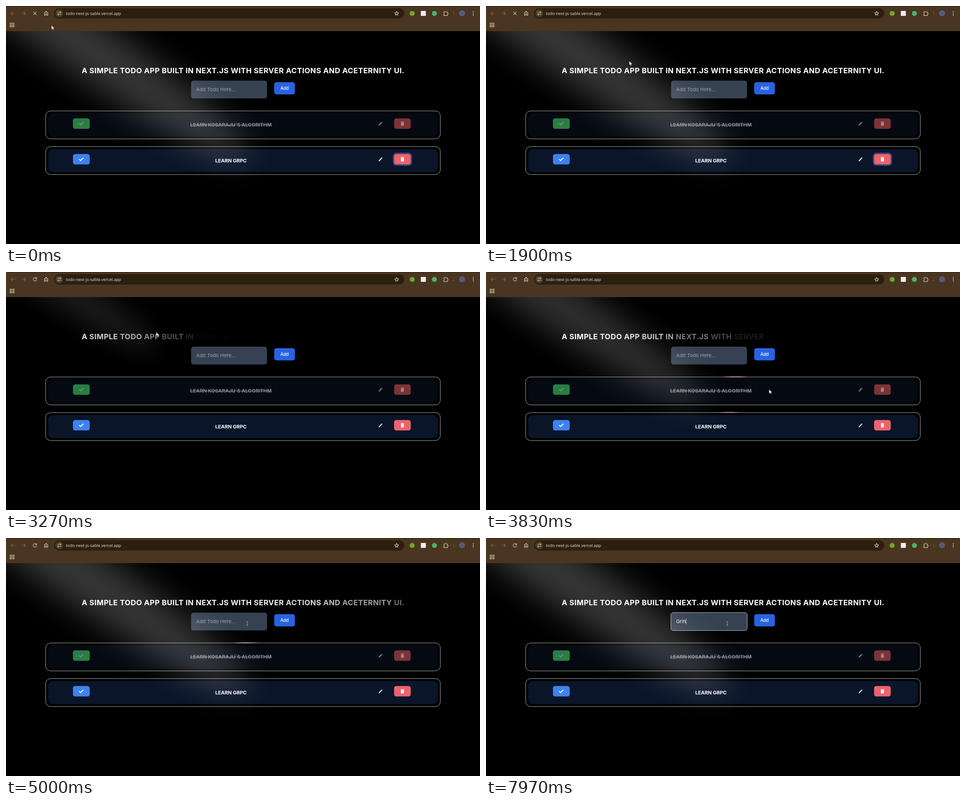
Write an HTML page that moves like this. It is 1055x531 px and loops after 8 s.

```html
<!DOCTYPE html>
<html lang="en">
<head>
<meta charset="utf-8">
<title>Todo app</title>
<style>
  html, body { margin: 0; width: 100%; height: 100%; overflow: hidden; background: #000; }
  svg { display: block; }
  text { font-family: Inter, sans-serif; fill: #fff; }
  .mid { text-anchor: middle; }
  .heading { font-size: 16.56px; font-weight: 700; letter-spacing: .414px; }
  .task { font-size: 11px; font-weight: 700; }
  .field { font-size: 11px; }
  .ui { font-family: "Open Sans", "Noto Sans", sans-serif; fill: #ece5dd; }
  .line { fill: none; stroke: #d9cbbd; stroke-width: 1.1; stroke-linecap: round; stroke-linejoin: round; }
  .dim { stroke: #806c59; }
</style>
</head>
<body>
<svg width="1055" height="531" viewBox="0 0 1055 531">
  <defs>
    <filter id="blur" filterUnits="userSpaceOnUse" x="0" y="0" width="3787" height="2842" color-interpolation-filters="sRGB">
      <feGaussianBlur stdDeviation="151"/>
    </filter>
    <radialGradient id="pink">
      <stop offset=".3" stop-color="#e58abf"/>
      <stop offset="1" stop-color="#e58abf" stop-opacity="0"/>
    </radialGradient>
    <path id="pencil" d="M3 17.25V21h3.75L17.81 9.94l-3.75-3.75zM20.71 7.04a1 1 0 0 0 0-1.41l-2.34-2.34a1 1 0 0 0-1.41 0l-1.83 1.83 3.75 3.75z"/>
    <path id="trash" d="M6 19c0 1.1.9 2 2 2h8c1.1 0 2-.9 2-2V7H6zM19 4h-3.5l-1-1h-5l-1 1H5v2h14z"/>
  </defs>
  <rect width="1055" height="531"/>

  <text id="heading" class="heading mid" x="527.7" y="150"></text>

  <rect x="412" y="166.5" width="169" height="39.8" rx="5.5" fill="#364152"/>
  <rect id="focus" x="411.6" y="166.3" width="169.8" height="40.2" rx="5.5" fill="none" stroke="#e8e8e8" stroke-width=".8"/>
  <text id="field" class="field" x="423.3" y="190"></text>
  <rect id="caret" y="180" width=".8" height="13" fill="#fff"/>
  <rect x="597" y="170" width="46" height="27.3" rx="5" fill="#2762e3"/>
  <text class="mid" x="620" y="187.4" font-size="9.62" font-weight="500">Add</text>

  <g id="cards"></g>

  <g id="spot">
    <g filter="url(#blur)">
      <ellipse cx="1924.71" cy="273.5" rx="1924.71" ry="273.5" fill="#fff" fill-opacity=".21"
        transform="matrix(-.822377 -.568943 -.568943 .822377 3631.88 2291.09)"/>
    </g>
  </g>

  <g id="popup">
    <path d="M489.5 213.5l5-5 5 5z" fill="#1e180f"/>
    <rect x="480" y="213" width="146" height="55.7" rx="3.5" fill="#1e180f"/>
    <text class="ui" x="488" y="231.3" font-size="8.25" font-weight="600">faf</text>
    <text class="ui" x="488" y="256" font-size="8.25" font-weight="600">Learn Kosaraju`s Algorithm</text>
  </g>

  <g id="toolbar">
    <rect width="1055" height="56" fill="#4a3521"/>
    <rect width="1055" height="1" fill="#33250f"/>
    <rect x="107" y="5" width="779" height="23" rx="11.5" fill="#2c1f0f"/>
    <circle cx="118.5" cy="16.5" r="8.7" fill="#493b2a"/>
    <path class="line" d="M114.5 14h3M120 18.7h3"/>
    <circle class="line" cx="120.6" cy="14" r="1.5"/>
    <circle class="line" cx="116.6" cy="18.7" r="1.5"/>
    <text class="ui" x="133" y="20" font-size="9.2">todo-next-js-sable.vercel.app</text>
    <path class="line dim" d="M19 16.3h-8m3.7-3.7l-3.7 3.7 3.7 3.7M35.5 16.3h8m-3.7-3.7l3.7 3.7-3.7 3.7"/>
    <path id="stop" class="line" d="M61.3 13.2l6.4 6.4m0-6.4l-6.4 6.4"/>
    <path id="reload" class="line" d="M67.8 14.3a3.9 3.9 0 1 0 .5 3M68.2 12.3v2.6h-2.6"/>
    <path class="line" d="M85.6 15.2l3.7-3 3.7 3v5.4h-2.4v-3.3h-2.6v3.3h-2.4z"/>
    <path class="line" d="M869.5 12l1.35 2.9 3.15.4-2.3 2.2.6 3.1-2.8-1.5-2.8 1.5.6-3.1-2.3-2.2 3.15-.4z"/>
    <circle cx="904" cy="16.5" r="5.6" fill="#70a52c"/>
    <rect x="923.3" y="11" width="11.2" height="11" fill="#eee"/>
    <circle cx="953.5" cy="16.5" r="5.5" fill="#45b866"/>
    <path class="line" d="M974.3 13.2h2.6a1.5 1.5 0 0 1 3 0h2.7v2.7a1.5 1.5 0 0 1 0 3v2.5h-8.3v-2.6a1.5 1.5 0 0 0 0-3z"/>
    <path d="M996.5 11.5v10" stroke="#705b45"/>
    <circle cx="1015" cy="16.3" r="6.7" fill="#59597c"/>
    <g fill="#e4d8cb">
      <circle cx="1040" cy="12.5" r="1.1"/><circle cx="1040" cy="16.3" r="1.1"/><circle cx="1040" cy="20.1" r="1.1"/>
    </g>
    <path class="line" d="M9 38h3.2v3.2h-3.2zM14.8 38h3.2v3.2h-3.2zM9 43.6h3.2v3.2h-3.2zM14.8 43.6h3.2v3.2h-3.2z"/>
  </g>

  <path id="arrow" d="M0 0v9.3l2.2-2 1.4 3.3 1.5-.6-1.4-3.2h3z" fill="#fff" stroke="#222" stroke-width=".5"/>
  <path id="beam" d="M-2.2-4.2q2 0 2.2 1 .2-1 2.2-1M0-3.2v6.8M-2.2 4.6q2 0 2.2-1 .2 1 2.2 1" fill="none" stroke="#b5bac2" stroke-width=".9"/>
</svg>
<script>
const LOOP = 8000, LOADED = 1970, FOCUS = 5700;
const $ = id => document.getElementById(id);
const show = (id, on) => $(id).setAttribute('visibility', on ? 'visible' : 'hidden');
const place = (id, x, y) => $(id).setAttribute('transform', `translate(${x} ${y})`);
const clamp = v => Math.min(1, Math.max(0, v));
const mix = (a, b, p) => a + (b - a) * p;

function bezier(x1, y1, x2, y2) {
  const at = (a, b, u) => 3 * a * u * (1 - u) ** 2 + 3 * b * u * u * (1 - u) + u ** 3;
  return x => {
    if (x <= 0 || x >= 1) return clamp(x);
    let lo = 0, hi = 1;
    for (let i = 0; i < 24; i++) {
      const u = (lo + hi) / 2;
      if (at(x1, x2, u) < x) lo = u; else hi = u;
    }
    return at(y1, y2, lo);
  };
}
const ease = bezier(.25, .1, .25, 1), fadeEase = bezier(.25, .1, .35, 1);

const words = 'A SIMPLE TODO APP BUILT IN NEXT.JS WITH SERVER ACTIONS AND ACETERNITY UI.'.split(' ');
$('heading').innerHTML = words.map(w => `<tspan>${w}</tspan>`).join(' ');
const spans = [...$('heading').children];

const cards = [
  { y: 234, text: 'LEARN KOSARAJU`S ALGORITHM', done: true, lap: 1183, phase: .247 },
  { y: 313.5, text: 'LEARN GRPC', done: false, lap: 1700, phase: .24 }
];
$('cards').innerHTML = cards.map(({ y, text, done }, i) => {
  const ink = done ? '#85888c' : '#fff';
  return `<g transform="translate(0 ${y})">
    <ellipse id="glow${i}" cy="-.2" rx="32" ry="1.3" fill="url(#pink)"/>
    <rect x="88.3" y=".2" width="878.4" height="62.3" rx="11" fill="none" stroke="#d8d8d8" stroke-width=".8"/>
    <rect x="94" y="5.8" width="867" height="51.2" rx="11" fill="${done ? '#050a12' : '#0b1529'}"/>
    <rect x="149" y="16.8" width="37.3" height="23.3" rx="5" fill="${done ? '#297f43' : '#3f81ef'}"/>
    <path d="M162.9 28.3l3.1 3.1 6-6.2" fill="none" stroke="${ink}" stroke-width="2"/>
    <text class="task mid" x="500.7" y="35" style="fill:${ink}" ${done ? 'text-decoration="line-through"' : ''}>${text}</text>
    <use href="#pencil" transform="translate(828.2 23) scale(.46)" fill="${ink}"/>
    ${done ? '' : '<rect id="ring" x="862.4" y="15.3" width="40" height="26.3" rx="6.5" fill="none" stroke="#27488f" stroke-width="3"/>'}
    <rect x="863.8" y="16.8" width="37" height="23.3" rx="5" fill="${done ? '#7b3239' : '#ee626d'}"/>
    <use href="#trash" transform="translate(875.9 22) scale(.53)" fill="${done ? '#a98589' : '#fff'}"/>
  </g>`;
}).join('');

// time, x, y
const path = [
  [0, 101, 43], [900, 300, 117], [1900, 319, 123], [3150, 330, 131], [3270, 334, 134],
  [3830, 630, 262], [4050, 640, 266], [4700, 537, 190], [LOOP, 537, 190]
];
function pointer(t) {
  const i = path.findIndex(k => k[0] > t), a = path[i - 1], b = path[i];
  const p = (t - a[0]) / (b[0] - a[0]);
  return [mix(a[1], b[1], p), mix(a[2], b[2], p)];
}

const keys = [7350, 7550, 7750, 7900];

function draw(t) {
  const fresh = t >= LOADED;
  show('stop', !fresh);
  show('reload', fresh);
  show('ring', !fresh);

  spans.forEach((s, i) => {
    const p = fresh ? fadeEase(clamp((t - 2000 - i * 200) / 2000)) : 1;
    s.setAttribute('fill-opacity', p);
  });

  const p = fresh ? ease(clamp((t - LOADED - 750) / 2000)) : 1;
  const x = 608.1 + mix(-.72, -.5, p) * 886.2, y = 402.5 + mix(-.62, -.4, p) * 803;
  $('spot').setAttribute('opacity', p);
  $('spot').setAttribute('transform', `translate(${x} ${y}) scale(${mix(.5, 1, p) * .234}) translate(-1893.5 -1421)`);

  // Glow laps the card; only the top edge lets it through
  cards.forEach(({ lap, phase }, i) => {
    const turn = (((t - 3830) / lap + phase) % 1 + 1) % 1;
    const gx = 88 + turn * 1884;
    show('glow' + i, fresh && gx > 125 && gx < 930);
    $('glow' + i).setAttribute('cx', gx);
  });

  const typed = keys.filter(k => t >= k).length, focused = t >= FOCUS;
  show('focus', focused);
  show('popup', focused && !typed);
  $('field').textContent = typed ? 'Grin'.slice(0, typed) : 'Add Todo Here...';
  $('field').style.fill = typed ? '#fff' : '#9aa2ae';
  const since = t - (typed ? keys[typed - 1] : FOCUS);
  show('caret', focused && Math.floor(since / 500) % 2 === 0);
  $('caret').setAttribute('x', 423.3 + (typed ? $('field').getComputedTextLength() : 0));

  const [mx, my] = pointer(t);
  const inField = mx > 412 && mx < 581 && my > 166 && my < 206;
  show('arrow', !inField);
  show('beam', inField);
  place('arrow', mx, my);
  place('beam', mx, my + .5);
}

const start = performance.now();
function tick() {
  draw((performance.now() - start) % LOOP);
  requestAnimationFrame(tick);
}
tick();
</script>
</body>
</html>
```
